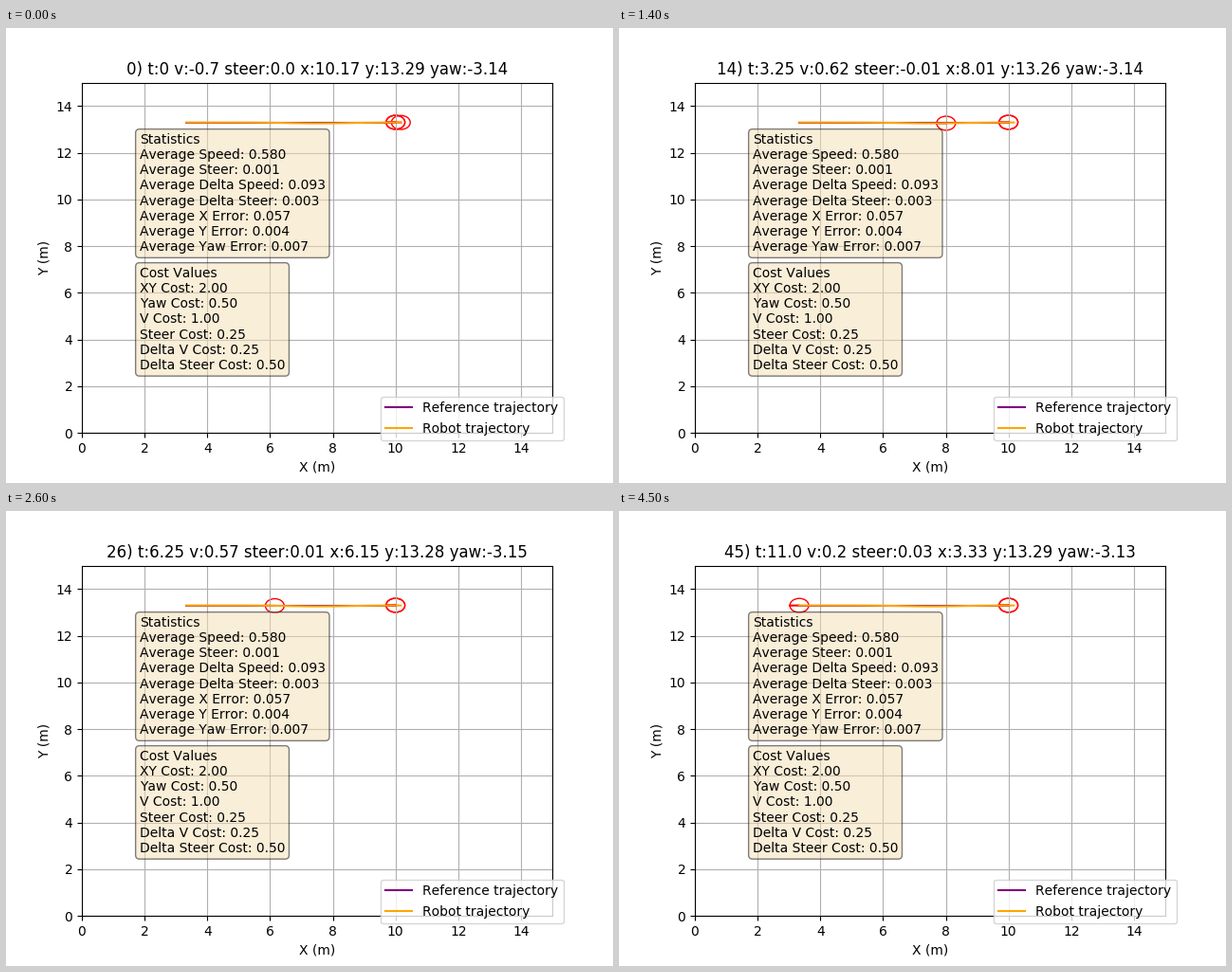
Animation, 640 px wide and 480 px high, one loop 4600 ms. Source, as a matplotlib script:

```python
import numpy as np
import matplotlib.pyplot as plt
from matplotlib.animation import FuncAnimation
from matplotlib.patches import Circle

STEPS = 46
DT = 0.25
RADIUS = 0.3
START = (10.0, 13.3, -3.14)

k = np.arange(STEPS)
spin_up = np.exp(-1.5 * k)
brake = np.clip((k - 41) / 4, 0, 1) ** 3


def through(*values):
    """Glide through a few way points."""
    return np.interp(k, (0, 10, 18, 26, 31, 38, 45), values)


x = through(10.17, 8.62, 7.40, 6.15, 5.39, 4.27, 3.20) + 0.13 * brake
y = 13.294 - 0.038 * np.exp(-((k - 17) / 8.5) ** 2)
yaw = through(-3.14, -3.13, -3.15, -3.15, -3.14, -3.15, -3.13)
speed = through(0.69, 0.69, 0.55, 0.57, 0.57, 0.61, 0.61) - 1.39 * spin_up - 0.41 * brake
steer = through(0, -0.003, -0.01, 0.006, 0, 0, 0) + 0.03 * brake

STATS = """Statistics
Average Speed: 0.580
Average Steer: 0.001
Average Delta Speed: 0.093
Average Delta Steer: 0.003
Average X Error: 0.057
Average Y Error: 0.004
Average Yaw Error: 0.007"""

COSTS = """Cost Values
XY Cost: 2.00
Yaw Cost: 0.50
V Cost: 1.00
Steer Cost: 0.25
Delta V Cost: 0.25
Delta Steer Cost: 0.50"""

plt.rcParams.update({"font.family": "DejaVu Sans", "text.kerning_factor": 6})
fig, ax = plt.subplots(figsize=(6.4, 4.8), dpi=100)
ax.set(xlim=(0, 15), ylim=(0, 15), xlabel="X (m)", ylabel="Y (m)",
       xticks=range(0, 15, 2), yticks=range(0, 15, 2))
ax.grid(True)


def place(robot, cx, cy, heading):
    ring, nose = robot
    ring.center = cx, cy
    nose.set_data([cx, cx + RADIUS * np.cos(heading)],
                  [cy, cy + RADIUS * np.sin(heading)])


def add_robot(*pose):
    ring = ax.add_patch(Circle((0, 0), RADIUS, fill=False, ec="red"))
    nose, = ax.plot([], [], color="red")
    place((ring, nose), *pose)
    return ring, nose


add_robot(*START)
add_robot(*START)
robot = add_robot(x[0], y[0], yaw[0])

ax.plot([START[0], x[-1]], [13.29, 13.29], color="purple", label="Reference trajectory")
ax.plot(x, y, color="orange", label="Robot trajectory")
ax.legend(loc="lower right", bbox_to_anchor=(1.038, -0.041), labelspacing=0.56)

box = dict(boxstyle="round", facecolor="wheat", alpha=0.5)
fig.text(0.22, 0.51, STATS, bbox=box)
fig.text(0.22, 0.25, COSTS, bbox=box)
title = ax.set_title("")


def update(i):
    place(robot, x[i], y[i], yaw[i])
    t = (i - 1) * DT if i else 0
    v, s, px, py, h = (round(float(a[i]), 2) for a in (speed, steer, x, y, yaw))
    title.set_text(f"{i}) t:{t} v:{v} steer:{s} x:{px} y:{py} yaw:{h}")
    return title, *robot


anim = FuncAnimation(fig, update, frames=STEPS, interval=1000 * 4.6 / STEPS,
                     repeat=True, repeat_delay=0)
plt.show()
```
